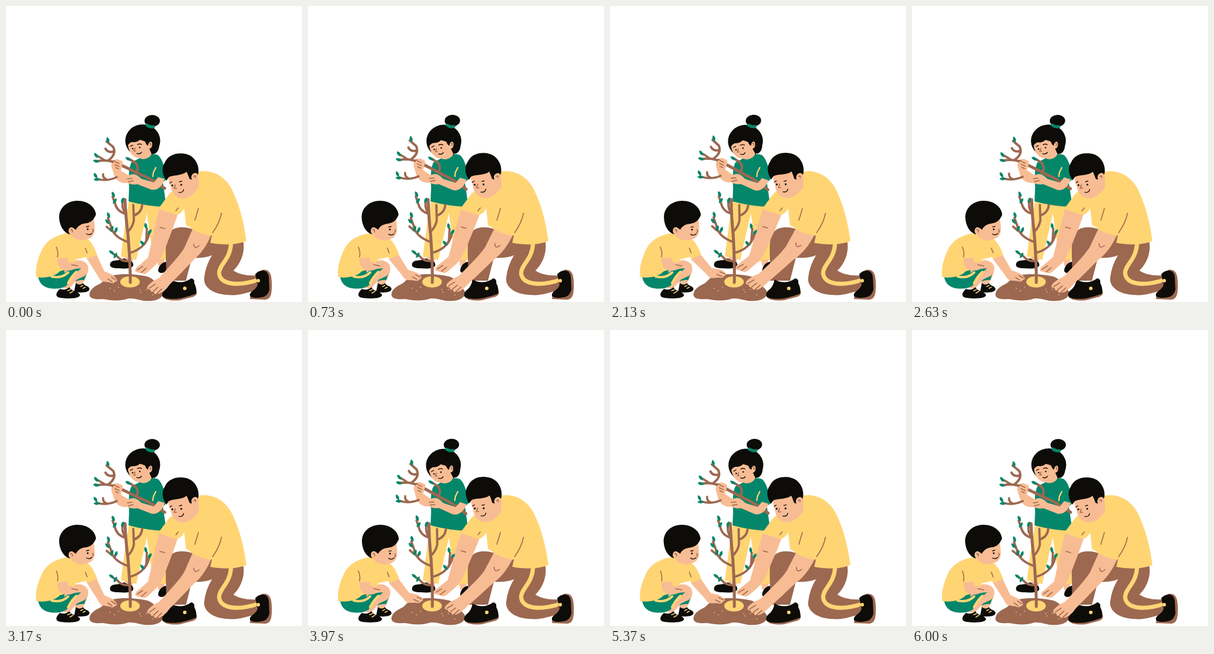
Animation, 500 px wide and 500 px high, one loop 6030 ms. Source, as an HTML page:

```html
<!DOCTYPE html>
<html lang="en">
<head>
<meta charset="utf-8">
<title>Planting a tree</title>
<style>
  html, body { margin: 0; width: 100%; height: 100%; overflow: hidden; background: #fff; }
  svg { display: block; width: 100vw; height: 100vh; }
  .yellow { fill: #ffd574; }
  .green { fill: #04866a; }
  .brown { fill: #9c6850; }
  .skin { fill: #f8bc94; }
  .black { fill: #0d0c08; }
  .line { fill: none; stroke-linecap: round; stroke-linejoin: round; }
  .wood { stroke: #9c6850; }
  .ink { stroke: #1b110c; stroke-width: 1.4; }
  .fold { stroke: #a06a4c; stroke-width: 1.6; }
  .trim { stroke: #ffd574; }
</style>
</head>
<body>
<svg viewBox="0 0 500 500">
  <g id="girlBody">
    <path class="yellow" d="M208 329L267 335L266 366L273 428L251 432L245 400L238 350L233 372L220 429L194 423L202 362Z"/>
    <path class="skin" d="M202 423L215 427L212 434L199 431ZM256 429L268 428L266 438L257 439Z"/>
    <path class="black" d="M176 435C179 427 191 432 199 426C208 432 214 428 215 437C215 444 200 444 189 443C180 443 174 441 176 435ZM257 447C258 436 267 431 273 432V445C269 452 258 453 257 447Z"/>
    <path class="green" d="M220 260C232 253 247 247 257 252C266 260 268 277 273 291L265 298L271 339Q240 339 207 330L208 306C207 291 207 273 212 264Z"/>
    <path class="line trim" stroke-width="2.2" d="M253 273L249 281L248 288"/>
  </g>

  <g id="girlHead">
    <ellipse class="black" cx="247" cy="194" rx="13" ry="10"/>
    <ellipse class="black" cx="231" cy="227.5" rx="29.5" ry="27.5"/>
    <path class="black" d="M240 228L259 232Q259 247 250 250L240 246Z"/>
    <path class="skin" d="M206 235Q210 229 216 230Q222 230 226 226Q231 227 235 229Q237 235 240 236C241 227 248 228 247 234C247 240 243 241 242 241L246 250C242 259 230 260 226 257C216 257 208 249 206 235Z"/>
    <path class="line" stroke="#04866a" stroke-width="5" d="M238 201Q243 205 249 204"/>
    <path class="line ink" d="M210 237L214 235M222 234Q226 232 229 234M221 249Q226 251 229 247"/>
    <path class="line fold" d="M218 240L216 245L219 245M243 232Q246 232 244 236"/>
    <circle class="black" cx="214" cy="241" r="1.3"/>
    <circle class="black" cx="226" cy="239" r="1.3"/>
  </g>

  <g id="branch">
    <path class="skin" d="M207 286L208 298C197 302 187 296 183 287L178 271C177 262 184 258 189 259L197 263L194 278Z"/>
    <g class="line wood">
      <path stroke-width="5" d="M182 263Q208 275 226 284Q248 293 268 308"/>
      <path stroke-width="4" d="M155 262Q171 259 186 265M174 260Q187 250 181 238L170 229M181 246Q172 248 168 241M220 282Q225 272 219 265L209 259"/>
      <path stroke-width="3.6" d="M154 292Q171 297 187 289M170 293Q163 290 164 284M166 260L156 254"/>
    </g>
    <g id="branchLeaves"></g>
    <path class="skin" d="M181 264Q187 258 194 261Q199 264 196 270Q195 276 190 284L180 276Z"/>
    <path class="line fold" d="M184 263L191 266M184 268L191 271M185 273L190 275"/>
    <path class="skin" d="M268 292C265 304 255 313 245 310L222 301C213 303 202 299 202 295Q201 291 206 287Q215 281 223 287L229 292L250 298L257 289Z"/>
    <path class="line fold" d="M205 292L213 291M207 297L215 295"/>
  </g>

  <path class="brown" d="M141 486C143 477 151 473 159 469C168 463 168 457 181 455C201 451 225 454 239 457C252 462 254 470 263 479C270 487 261 497 246 498C228 500 223 493 207 494C188 500 178 497 163 495C151 496 140 495 141 486Z"/>
  <ellipse class="yellow" cx="209.5" cy="466" rx="16.5" ry="9.5"/>
  <g id="specks" fill="#e4b47c"></g>

  <g id="fatherLegs">
    <path class="brown" d="M271 392C276 374 294 371 312 376L401 399C404 418 395 437 384 447Q400 457 424 455L425 480C405 484 394 490 375 488C349 487 332 474 335 458Q337 439 348 421C336 426 323 426 314 425L304 464L270 464C272 440 268 413 271 392Z"/>
    <path class="line trim" stroke-width="7" stroke-linecap="butt" d="M380 402C379 428 359 438 360 452C363 472 394 473 425 463"/>
    <path class="brown" d="M263 488C264 496 280 499 294 497L317 491Q324 488 322 481Z"/>
    <path class="black" d="M278 462Q296 472 313 460Q319 461 318 468Q323 478 321 486C305 492 290 496 276 494.500C262 494 261 486 268 480Q276 474 278 462Z"/>
    <path class="brown" d="M432 446C447 443 449 456 449 472C449 487 447 496 437 496L412 495L413 486Z"/>
    <path class="black" d="M421 453C430 443 443 445 444 458L445 479Q442 491 432 492C423 494 411 493 412 488C412 482 424 479 425 470Z"/>
    <circle class="yellow" cx="302" cy="477" r="3"/>
    <circle class="yellow" cx="426" cy="464" r="3"/>
  </g>

  <g id="fatherFarArm">
    <path class="skin" d="M259 342L290 352C284 371 276 391 270 407C265 421 259 432 251 439C242 447 236 455 231 452L226 451L219 449Q216 445 224 439L240 425C245 406 251 370 259 342Z"/>
    <path class="line fold" d="M260 374L268 376M222 446L231 440M229 450L237 443"/>
  </g>

  <g id="tree">
    <g class="line wood">
      <path stroke-width="5" d="M210 467Q210 435 206 386Q202 355 201 327"/>
      <path stroke-width="3.8" d="M207 399Q180 390 177 371L172 358M202 351Q187 347 184 333L180 322M184 383Q176 379 170 373M205 382Q214 374 216 362L215 336M216 354Q229 349 230 336M209 417Q230 411 237 396L238 376M234 402Q241 392 242 383M209 431Q195 432 188 423L180 418M201 349Q195 340 197 331"/>
    </g>
    <g id="treeLeaves"></g>
  </g>

  <path class="yellow" d="M276 317L324 280C352 275 374 291 384 315C397 343 403 373 406 397C390 404 365 404 345 400L348 387L316 377L304 370L301 342Q295 353 287 353L257 343Z"/>

  <g id="fatherNearArm">
    <path class="skin" d="M316 375L347 386C339 405 330 418 318 428C302 444 289 459 278 469C269 480 260 488 255 486Q250 488 250 483Q244 484 244 479Q237 480 239 474Q244 466 259 459C276 440 291 425 301 409Z"/>
    <path class="line fold" d="M317 402Q318 412 326 405M242 477L252 470M249 482L257 475M255 486L263 478"/>
  </g>
  <path class="yellow" d="M321 340C311 354 311 368 314 377Q330 386 347 388L365 350Z"/>
  <path class="line fold" stroke-width="2" d="M325 342L319 362M364 350Q361 366 349 383M291 341L287 346"/>

  <g id="fatherHead">
    <path class="skin" d="M274 287C278 278 293 275 304 275L325 281L326 306C319 317 310 324 302 325C286 326 280 316 278 304C275 298 274 293 274 287Z"/>
    <path class="black" d="M271 295C263 284 263 272 268 265C274 250 291 247 304 250C318 253 327 268 325 282L321 291L313 293L310 292Q308 286 305 280C297 287 283 285 275 289Z"/>
    <path class="skin" d="M313 290C313 281 324 279 324 287Q323 294 315 295Z"/>
    <path class="line ink" d="M277 299L280 297M293 297L297 296M292 315Q299 316 300 310"/>
    <path class="line fold" d="M286 302L284 308L288 308M317 288Q321 285 320 290"/>
    <circle class="black" cx="281" cy="303" r="1.6"/>
    <circle class="black" cx="296" cy="302" r="1.6"/>
  </g>

  <g id="child">
    <path class="skin" d="M120 450L139 447L134 461L128 471L117 469Z"/>
    <path class="green" d="M54 456C57 475 72 479 91 477C108 472 119 461 132 463L138 446Q134 431 118 430L91 445Z"/>
    <path class="skin" d="M99 444C106 430 124 425 135 434C142 441 139 450 133 456L120 462L106 478L96 476Z"/>
    <path class="green" d="M57 455Q94 459 106 445L127 443Q113 454 102 473Q90 479 73 476Q60 471 57 455Z"/>
    <path class="line trim" stroke-width="4" d="M77 457Q94 461 105 450M119 449Q111 456 105 468"/>
    <path class="black" d="M118 468Q125 473 130 468C133 474 140 472 141 478C141 484 128 485 115 483ZM91 478Q101 481 107 475C111 483 123 482 125 488C125 494 108 495 92 493C83 492 83 485 91 478Z"/>
    <path class="line trim" stroke-width="1.5" d="M104 481L109 479M108 485L113 482M126 474L130 472M130 477L134 475"/>
    <g id="childArm">
      <path class="skin" d="M136 426L152 418L166 448L179 454Q189 461 187 465L183 467Q180 470 174 467L162 465Q157 462 155 456Z"/>
      <path class="line fold" d="M178 458L185 463M172 461L179 466"/>
    </g>
    <path class="yellow" d="M108 383C86 386 70 394 61 411C53 428 49 443 51 458C64 460 82 458 91 448L110 443L118 428L135 424L138 427L154 420C149 407 143 394 130 389Z"/>
    <path class="skin" d="M87 426L105 425L104 431L118 435Q126 437 122 442L111 446Q101 449 92 443Q86 437 87 426Z"/>
    <path class="line fold" d="M85 407Q89 416 87 424M134 409L137 417M111 437L121 439"/>
  </g>

  <g id="childHead">
    <path class="skin" d="M106 376L122 364L148 357C149 365 150 372 150 379Q149 391 137 394Q124 399 112 390Z"/>
    <path class="black" d="M90 360C88 343 101 330 119 329C138 328 151 340 152 352C149 360 144 366 135 367C126 368 121 372 118 378C113 373 106 374 108 386C97 383 91 371 90 360Z"/>
    <path class="skin" d="M116 379C113 370 104 374 106 382Q109 390 117 386Z"/>
    <path class="line ink" d="M136 373L140 372M136 385Q141 388 145 384"/>
    <path class="line fold" d="M146 377Q149 380 146 382M109 378Q113 377 112 382"/>
    <circle class="black" cx="138" cy="377" r="1.5"/>
  </g>
</svg>

<script>
const LOOP = 6030;
const SWAYS_PER_LOOP = 2;
const el = id => document.getElementById(id);

// Each leaf: x, y, direction in degrees.
function addLeaves(id, leaves) {
  el(id).innerHTML = leaves.map(([x, y, angle]) =>
    `<path class="green" d="M-5 0Q0 -5 6 0Q0 5 -5 0Z" transform="translate(${x} ${y}) rotate(${angle})"/>`
  ).join('');
}

addLeaves('branchLeaves', [
  [172, 226, 75], [152, 252, 50], [152, 262, 15], [151, 286, 60], [153, 293, 0], [206, 258, 30]
]);
addLeaves('treeLeaves', [
  [181, 318, 65], [184, 329, 125], [197, 328, 110], [173, 353, 70], [171, 364, 50],
  [179, 376, 110], [186, 378, 110], [236, 371, 80], [243, 381, 125],
  [230, 400, 50], [178, 416, 35], [185, 421, 120]
]);

el('specks').innerHTML = [[176, 477], [183, 481], [190, 475], [228, 483], [237, 479], [226, 479], [248, 488]]
  .map(([x, y]) => `<circle cx="${x}" cy="${y}" r="1"/>`).join('');

// Each joint: pivot, swing in degrees, lag in degrees of the cycle.
const joints = [
  ['girlHead', 240, 258, -6.3, 4],
  ['branch', 225, 285, 4.6, 6],
  ['fatherHead', 315, 318, 4, 4],
  ['fatherFarArm', 284, 345, 5, 12],
  ['fatherNearArm', 335, 365, 6.6, 12],
  ['childHead', 118, 392, 3.2, 4],
  ['childArm', 146, 423, -19, 14],
  ['tree', 210, 466, 2.1, 10]
].map(([id, x, y, swing, lag]) => ({ node: el(id), x, y, swing, lag: lag * Math.PI / 180 }));

function draw(time) {
  const phase = (time % LOOP) / LOOP * SWAYS_PER_LOOP * 2 * Math.PI;
  for (const { node, x, y, swing, lag } of joints) {
    const lift = (1 - Math.cos(phase - lag)) / 2;
    node.setAttribute('transform', `rotate(${(swing * lift).toFixed(3)} ${x} ${y})`);
  }
}

const start = performance.now();
function tick() {
  draw(performance.now() - start);
  requestAnimationFrame(tick);
}
tick();
</script>
</body>
</html>
```
